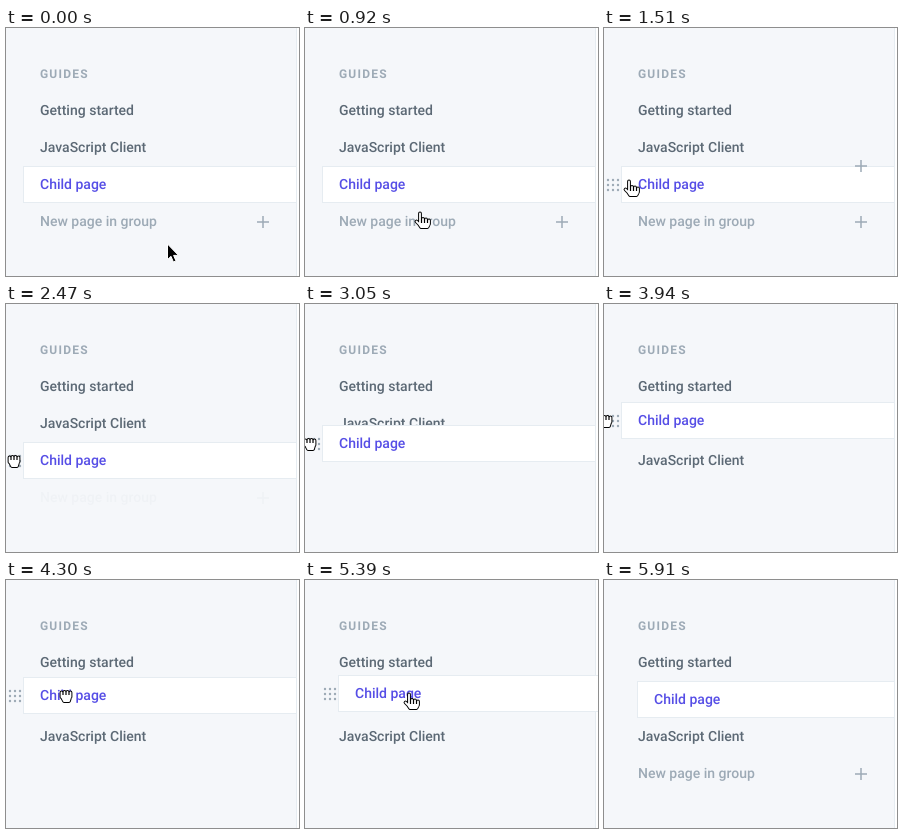
An HTML page for the animation above (6.24 s loop, 293x248 px).

```html
<!DOCTYPE html>
<html lang="en">
<head>
<meta charset="utf-8">
<title>Page tree drag</title>
<style>
  html, body { margin: 0; width: 100%; height: 100%; overflow: hidden; background: #f5f7fa; }
  svg { display: block; width: 293px; height: 248px; }
  text { font: 500 14px Roboto, sans-serif; fill: #5c6975; text-rendering: geometricPrecision; -webkit-font-smoothing: antialiased; }
  .muted { fill: #9daab6; }
  .guides { font-size: 12px; font-weight: 700; letter-spacing: 1.2px; }
  .active { fill: #564ee6; }
  #plus { stroke: #9daab6; stroke-width: 1.5; }
  #handle { fill: #9daab6; }
  #ink, #skin { stroke-linecap: round; stroke-linejoin: round; }
  #ink { fill: #000; stroke: #000; stroke-width: 3.8; }
  #skin { fill: #fff; stroke: #fff; stroke-width: 1.8; }
  #arrow { fill: #000; stroke: #fff; }
</style>
</head>
<body>
<svg viewBox="0 0 293 248">
  <defs><path id="plus" d="M-6 0H6M0-6V6"/></defs>
  <rect width="293" height="248" fill="#f5f7fa"/>
  <rect x="291" width="2" height="248" fill="#fff"/>
  <rect x="290" width="1" height="248" fill="#e6ecf1"/>
  <text class="muted guides" x="34" y="50">GUIDES</text>
  <text x="34" y="87">Getting started</text>
  <text id="client" x="34">JavaScript Client</text>
  <g id="add">
    <text class="muted" x="34" y="198">New page in group</text>
    <use href="#plus" x="257" y="194"/>
  </g>
  <g id="row">
    <rect id="box" x="17.5" y=".5" height="36" fill="#fff" stroke="#e6ecf1"/>
    <text class="active" x="34" y="23">Child page</text>
  </g>
  <g id="handle"></g>
  <use id="insert" href="#plus" x="257"/>
  <g id="cursor">
    <path id="arrow" d="M.5 0V15.6L4 12.3 6.4 18 9 16.9 6.6 11.4H11.5Z"/>
    <path id="ink"/>
    <path id="skin"/>
  </g>
</svg>
<script>
const LOOP = 6240, GRAB = 2350, INDENT = 4430, DROP = 5390;
const $ = id => document.getElementById(id);

// fingers and thumb are thick strokes, the palm is a filled shape
const HANDS = {
  point: 'M0 .5V10M3 6V10M6 6.5V10M9 7.5V11M-3.5 8.5L0 12M-1 11L1 14H7.500L9 11Z',
  open: 'M-4.5-4L-2.500 1M-1.5-6V1M1.5-6V1M4.5-4.5L4 1M-6 1L-3 4M-4 1L-2 6H3.500L4.500 1Z',
  fist: 'M-4.500-3.500V1M-1.5-4V1M1.5-4V1M4.5-3.500V1M-4.500 0L-2 5H3L4.500 0Z'
};

// cursor strokes: start, end, x, y reached
const START = [161, 216];
const MOVES = [
  [750, 1370, 64, 150], [1370, 1680, 8, 154], [1940, 2170, 8, 157],
  [2880, 3600, 2, 117], [3940, 5000, 104, 114.4], [5440, 5910, 272, 251]
];

const mix = (a, b, k) => a + (b - a) * k;
const ramp = (t, from, to) => Math.min(1, Math.max(0, (t - from) / (to - from)));
const easeOut = k => 1 - (1 - k) ** 2;
const move = (el, x, y) => el.setAttribute('transform', `translate(${x} ${y})`);
const show = (el, on) => el.setAttribute('visibility', on ? 'visible' : 'hidden');

for (let i = 0; i < 9; i++) {
  $('handle').innerHTML += `<circle cx="${i % 3 * 5 - 5}" cy="${(i / 3 | 0) * 5 - 5}" r="1.2"/>`;
}

function cursorAt(t) {
  let [x, y] = START;
  for (const [from, to, toX, toY] of MOVES) {
    const k = easeOut(ramp(t, from, to));
    x = mix(x, toX, k);
    y = mix(y, toY, k);
  }
  return [Math.round(x), Math.round(y)];
}

function draw(t) {
  const [x, y] = cursorAt(t);
  const dragging = t >= GRAB && t < DROP;
  const indent = t < INDENT ? 0 : 16;
  const settle = easeOut(ramp(t, 5440, 5640));
  const top = t < GRAB ? 138 : dragging ? y - 19 : Math.round(mix(95, 101, settle));

  move($('row'), indent, top);
  $('box').setAttribute('width', 273 - 16 * settle);
  $('client').setAttribute('y', mix(124, 161, easeOut(ramp(t, 3100, 3300))));
  $('add').setAttribute('opacity', t < 2880 ? 1 - .94 * ramp(t, 2320, 2470) : ramp(t, 5480, 5700));

  // the hovered row shows its drag handle and an insert mark
  const onChild = dragging || y >= top && y < top + 37;
  const onClient = t > DROP && !onChild && y >= 138 && y < 175;
  const hovered = onChild || onClient;
  const hoverTop = onChild ? top : 138;
  show($('handle'), hovered);
  move($('handle'), onChild ? 9 + indent : 9, hoverTop + 19);
  show($('insert'), hovered && (t < GRAB || t > 5440));
  move($('insert'), 0, hoverTop);

  const arrow = y >= 212;
  const hand = dragging ? 'fist' : x < 17 ? 'open' : 'point';
  show($('arrow'), arrow);
  for (const id of ['ink', 'skin']) {
    show($(id), !arrow);
    $(id).setAttribute('d', HANDS[hand]);
  }
  move($('cursor'), x, y);
}

const start = performance.now();
function tick() {
  draw((performance.now() - start) % LOOP);
  requestAnimationFrame(tick);
}
tick();
</script>
</body>
</html>
```
